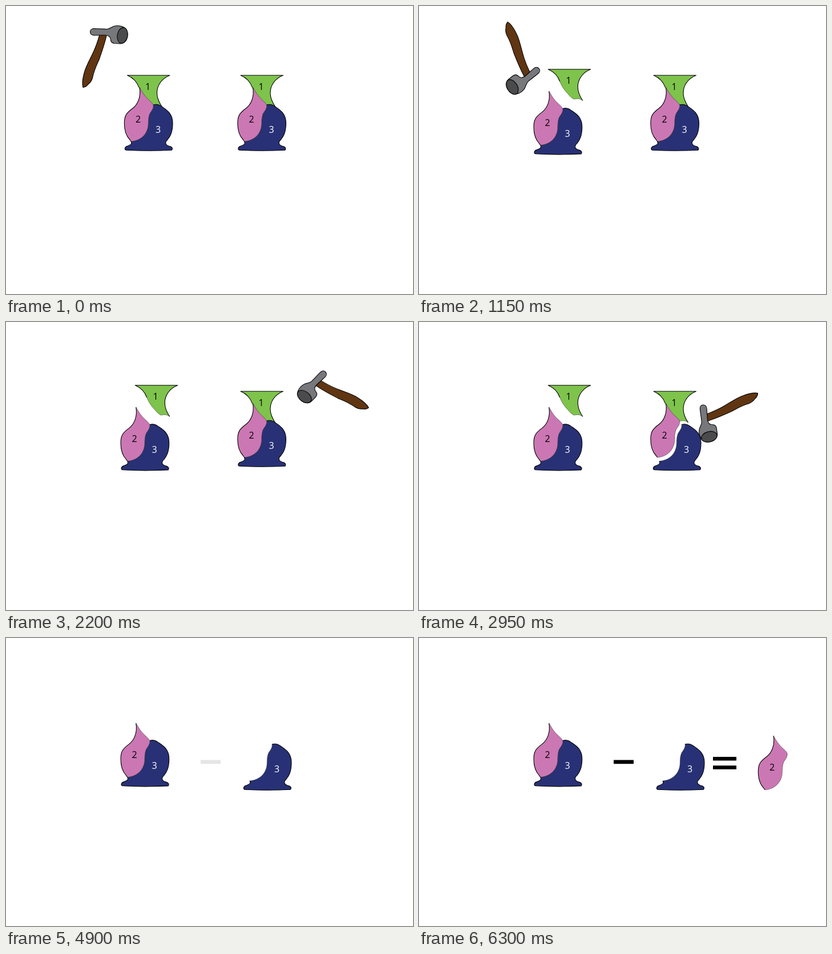
These frames come from a looping animation (713x504 px, 6450 ms). An HTML page:

```html
<!DOCTYPE html>
<html lang="en">
<head>
<meta charset="utf-8">
<title>Broken vases</title>
<style>
  html, body { margin: 0; width: 100%; height: 100%; overflow: hidden; background: #fff; }
  svg { display: block; width: 100vw; height: 100vh; }
  text { font: 16px "Open Sans", "Noto Sans", sans-serif; text-anchor: middle; }
  .line { fill: none; stroke: #000; stroke-width: 1.1; stroke-linejoin: round; }
  .crack { fill: none; stroke: #222; stroke-width: .5; }
  #hammer path, #hammer ellipse { stroke: #000; stroke-width: 1.1; stroke-linejoin: round; }
</style>
</head>
<body>
<svg id="stage" viewBox="0 0 713 504">
  <defs id="defs"></defs>
  <g id="pieces"></g>
  <g id="signs">
    <path id="minus" d="M341 213.5h35v6.7h-35z"/>
    <path id="equals" d="M515 208h41v6.5h-41zM515 223.3h41v6.5h-41z"/>
  </g>
  <g id="hammer">
    <path fill="#603512" d="M164 50C160 65 157 73 151 85C145 97 139 108 137 117C134 128 133 136 135 142.500C139 142 142 140 144 137C148 134 150 131 151.500 126C154 113 158 105 163 94C168 80 173 66 176.500 50Z"/>
    <path fill="#77787b" d="M153 39.500C164 39.500 171 40.500 177 40.500C184 40 185 34.500 195 34.500C206 34.500 213 40 213 50C213 60 207 66 200 66L190 65.500C184 65 183.500 61 183 57C182 52 178 51 173 51L154 51.200C145.500 51 145.500 40 153 39.500Z"/>
    <ellipse fill="#4b4b4d" cx="204" cy="51.500" rx="9" ry="14" transform="rotate(10 204 51.500)"/>
  </g>
</svg>
<script>
const LOOP = 6450, STEP = 50, RIGHT = 198.5;
const $ = id => document.getElementById(id);

// Each piece: fill, label, outer contour, broken edge
const shapes = {
  blue: {
    fill: '#283175', ink: '#fff', label: ['3', 266.5, 222],
    line: 'M258 173C265 171 269 173 273 176C280 181 292 187 292 205C292 222 287 229 283 234C278 238 279 243 285 245C291 246 292 249 291 251Q291 252.500 289 252.300C265 253.500 235 253.500 211 252.200C206.500 252 208 246 213 245C219 243 221 241 219 237',
    crack: 'C228 236.500 240 232 246 220C252 208 247 200 252 188C256 182 259 178 258 173'
  },
  pink: {
    fill: '#cb77b3', ink: '#000', label: ['2', 231.5, 203.5],
    line: 'M219 237L217 234C213 230 207.300 222 207.300 205C207.300 192 211 187 222 179C230 173 237 160 234 142.500',
    crack: 'C239 151 243 158 250 164C253 167 256 169 258 173C259 178 256 182 252 188C247 200 252 208 246 220C240 232 228 236.500 219 237'
  },
  green: {
    fill: '#7ec34c', ink: '#000', label: ['1', 248.5, 146.5],
    line: 'M233 142.500C230 134 224 126 212.500 121.200L287 121.200C272 127 264.500 140 264.500 152C264.500 161 269 170 273 176',
    crack: 'C268 172 264 172.500 257.500 173.500C253 171 250 168 247 164C240 157 236 150 233 142.500'
  }
};

$('defs').innerHTML = Object.entries(shapes).map(([name, s]) => {
  const end = s.line.match(/[\d.]+ [\d.]+$/)[0];
  const [digit, x, y] = s.label;
  return `<g id="${name}"><path d="${s.line}${s.crack}Z" fill="${s.fill}"/>
    <path class="crack" d="M${end}${s.crack}"/><path class="line" d="${s.line}"/>
    <text x="${x}" y="${y}" fill="${s.ink}">${digit}</text></g>`;
}).join('');

function addPiece(name) {
  const use = document.createElementNS('http://www.w3.org/2000/svg', 'use');
  use.setAttribute('href', '#' + name);
  return $('pieces').appendChild(use);
}
const addVase = () => ({ green: addPiece('green'), blue: addPiece('blue'), pink: addPiece('pink') });
const left = addVase(), right = addVase(), answer = addPiece('pink');

const ramp = (t, from, to) => Math.min(1, Math.max(0, (t - from) / (to - from)));
const easeOut = p => 1 - (1 - p) ** 2;

function place(el, x, y, alpha = 1) {
  el.setAttribute('transform', `translate(${x} ${y})`);
  el.setAttribute('opacity', alpha);
}

// Hammer keys: time, pivot x, pivot y, handle angle, striking angle, easing
const keys = [
  [0, 164, 88, 110.8, 20.8],
  [400, 156, 88, 158.8, 68.8],
  [600, 165.6, 87.6, 183, 93],
  [1150, 169.5, 88, 249.6, 159.6, easeOut],
  [2050, 584, 124.3, 396.5, 126.5],
  [2950, 541.5, 158, 334.5, 64.5],
  [3250, 535, 156, 290, 20]
];
const unit = deg => [Math.cos(deg * Math.PI / 180), Math.sin(deg * Math.PI / 180)];
const handle0 = unit(110.8), strike0 = unit(20.8);

function poseHammer(t) {
  const next = keys.findIndex(k => k[0] > t);
  const i = next < 0 ? keys.length - 1 : next;
  const a = keys[i - 1], b = keys[i], ease = a[5] || (p => p);
  const p = ease(ramp(t, a[0], b[0]));
  const [x, y, handle, strike] = [1, 2, 3, 4].map(n => a[n] + (b[n] - a[n]) * p);
  const h = unit(handle), s = unit(strike);
  const m = (r, c) => h[r] * handle0[c] + s[r] * strike0[c];
  $('hammer').setAttribute('transform',
    `matrix(${m(0, 0)} ${m(1, 0)} ${m(0, 1)} ${m(1, 1)} ${x} ${y}) translate(-164 -88)`);
  $('hammer').setAttribute('visibility', t < 3300 ? 'visible' : 'hidden');
}

function draw(t) {
  const split = ramp(t, 600, 1150);
  place(left.green, 13.7 * split, -10.5 * split, 1 - ramp(t, 4150, 4600));
  place(left.pink, -6.3 * split, 6.6 * split);
  place(left.blue, -6.3 * split, 6.6 * split);

  const gap = ramp(t, 2800, 2950), push = ramp(t, 2950, 3250);
  const x = RIGHT + 6 * push, y = 6.5 * push, rest = 1 - ramp(t, 3700, 4150);
  place(right.green, x, y, rest);
  place(right.pink, x, y, rest);
  place(right.blue, x + 3.5 * gap, y + 6.5 * gap);

  $('minus').setAttribute('opacity', ramp(t, 4850, 5350));
  $('equals').setAttribute('opacity', ramp(t, 5350, 5850));
  place(answer, 387, 28.7, ramp(t, 5850, 6300));
  poseHammer(t);
}

const start = performance.now();
function tick() {
  const t = Math.max(0, performance.now() - start) % LOOP;
  draw(Math.floor(t / STEP) * STEP);
  requestAnimationFrame(tick);
}
tick();
</script>
</body>
</html>
```
